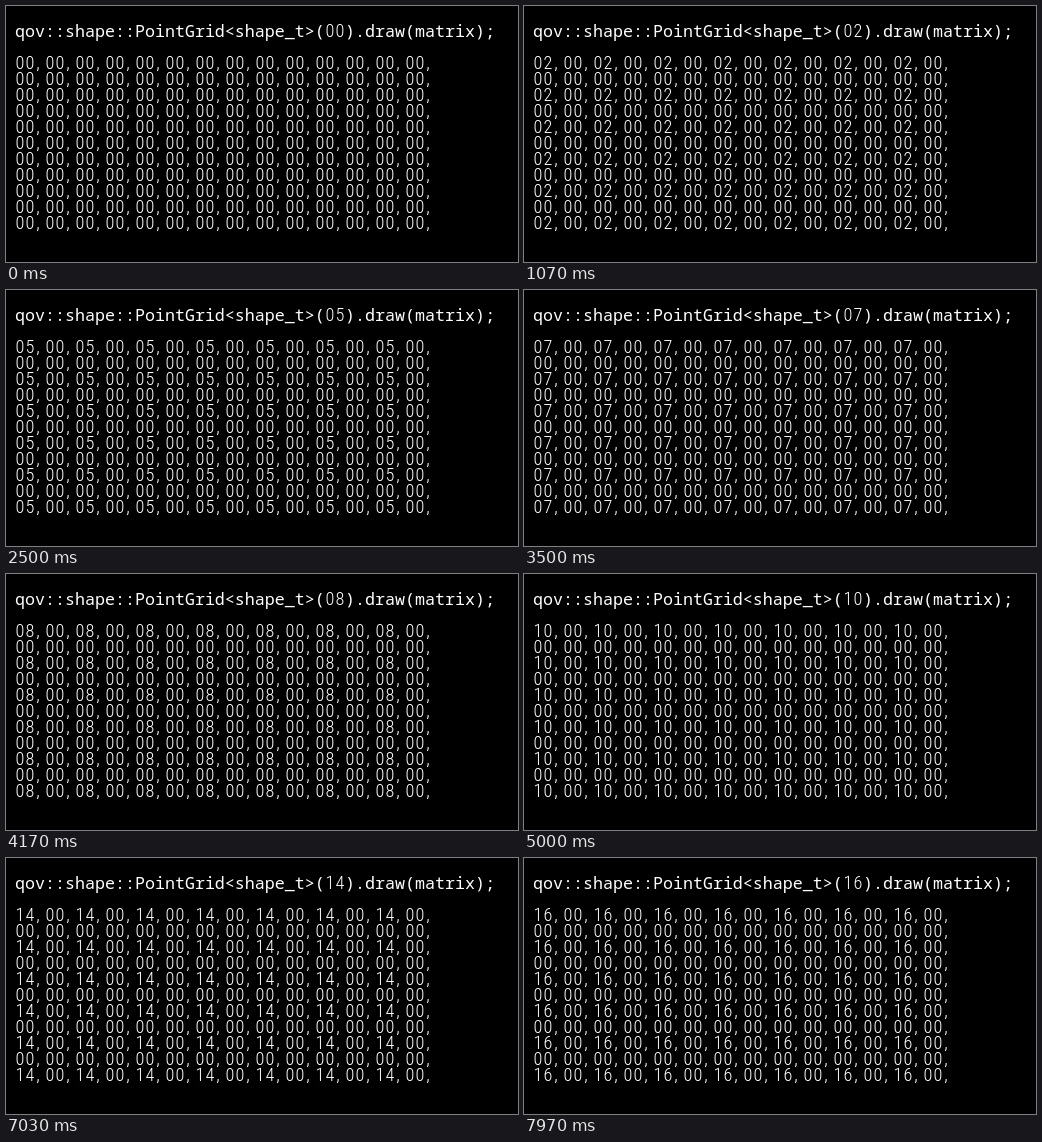
Write an HTML page that moves like this. It is 512 by 256 pixels and loops after 8 s.

```html
<!DOCTYPE html>
<html lang="en">
<head>
<meta charset="utf-8">
<title>Point grid</title>
<style>
  html, body { margin: 0; width: 100%; height: 100%; overflow: hidden; background: #000; }
  svg { display: block; width: 512px; height: 256px; fill: #fff; }
  text { white-space: pre; }
  .code { font: 300 16.667px "Noto Sans Mono", "Liberation Mono", monospace; font-variant-ligatures: none; }
  .cells {
    font: 300 18.3px "Roboto Condensed", Roboto, "Liberation Sans", sans-serif;
    font-stretch: 75%;
    font-kerning: none;
    text-anchor: middle;
  }
</style>
</head>
<body>
<svg viewBox="0 0 512 256">
  <text class="code" x="9" y="31">qov::shape::PointGrid&lt;shape_t&gt;(</text>
  <text class="code" x="339" y="31">).draw(matrix);</text>
</svg>
<script>
  const LOOP = 8000, CELL = 10, ROWS = 11, COLS = 14;
  // Moments at which the counter goes up by one
  const ticks = [570, 1070, 1500, 1930, 2500, 3000, 3500, 4030,
                 4500, 5000, 5500, 6000, 6500, 7030, 7530, 7970];
  const svg = document.querySelector('svg');

  // One text line with every character centred in its own cell
  function addCells(left, baseline, sample) {
    const line = document.createElementNS(svg.namespaceURI, 'text');
    const centres = [...sample].map((c, i) => left + i * CELL + (c === ',' ? 2 : 4));
    line.setAttribute('class', 'cells');
    line.setAttribute('x', centres.join(' '));
    line.setAttribute('y', baseline);
    line.textContent = sample;
    return svg.appendChild(line);
  }

  const counter = addCells(320, 31, '00');
  const rows = Array.from({ length: ROWS },
    (_, r) => addCells(10, 63 + r * 16, '00,'.repeat(COLS)));

  let shown = 0;
  function draw() {
    const t = performance.now() % LOOP;
    const value = ticks.filter(tick => tick <= t).length;
    if (value !== shown) {
      shown = value;
      const label = String(value).padStart(2, '0');
      counter.textContent = label;
      rows.forEach((row, r) => {
        if (r % 2 === 0) row.textContent = `${label},00,`.repeat(COLS / 2);
      });
    }
    requestAnimationFrame(draw);
  }
  draw();
</script>
</body>
</html>
```
